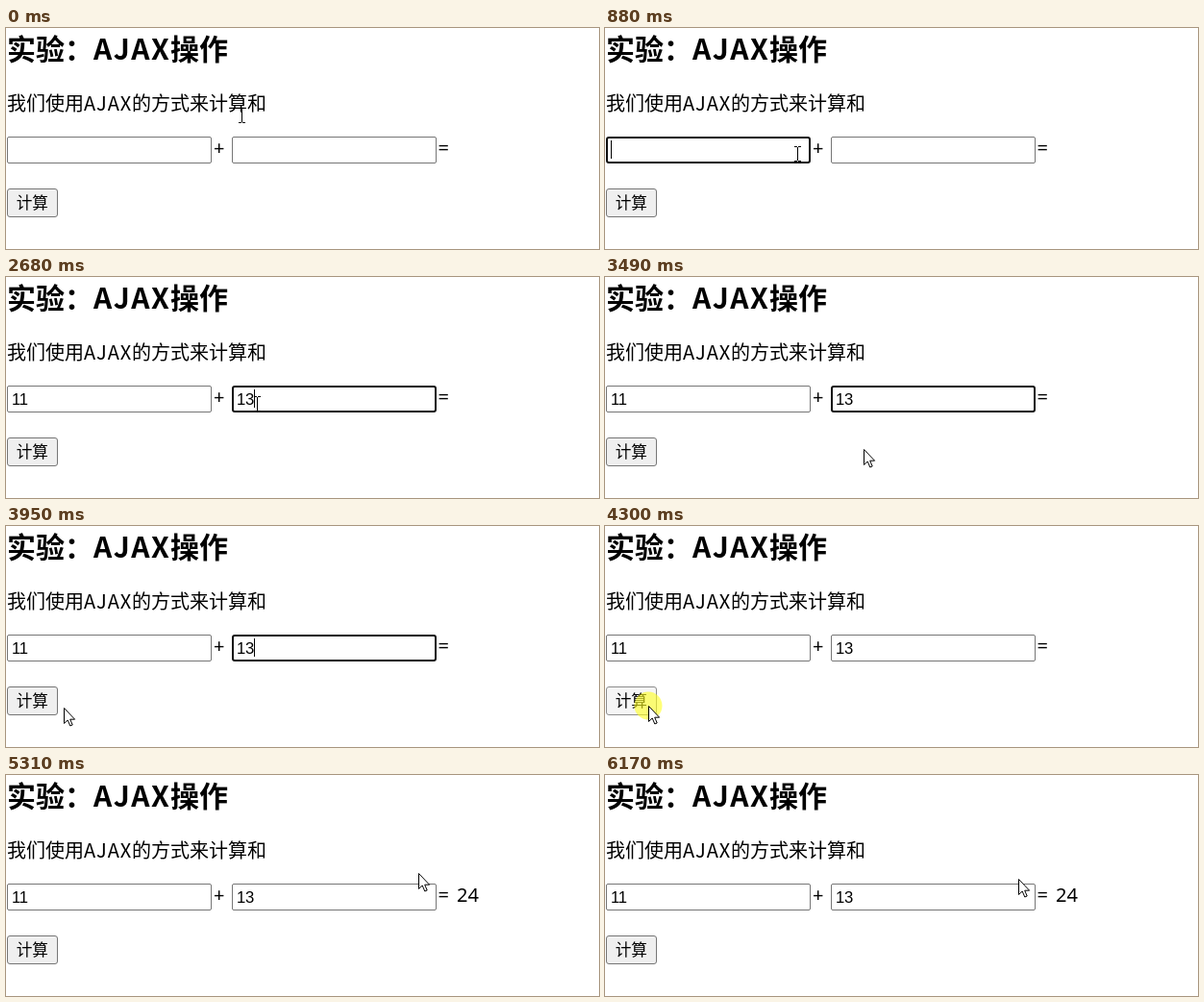
These frames come from a looping animation (617x230 px, 6240 ms). An HTML page:

```html
<!DOCTYPE html>
<html lang="zh-CN">
<head>
<meta charset="utf-8">
<title>AJAX</title>
<style>
  html, body { margin: 0; width: 100%; height: 100%; overflow: hidden; background: #fff; }
  svg { display: block; width: 617px; height: 230px; }
  text { white-space: pre; font: 20px "Noto Sans CJK SC", "Noto Sans CJK", sans-serif; }
  .title { font-size: 30px; font-weight: 700; }
  .latin { font-family: "Noto Sans", sans-serif; }
  .value { font: 16.67px "Liberation Sans", Arial, sans-serif; letter-spacing: -.27px; }
  .label { font-size: 16.67px; }
</style>
</head>
<body>
<svg viewBox="0 0 617 230">
  <text class="title" x="1" y="33">实验：</text>
  <text class="title" x="91" y="33" letter-spacing="1.5">AJAX</text>
  <text class="title" x="171" y="33">操作</text>
  <text x="1" y="86">我们使用</text>
  <text x="81" y="86" letter-spacing=".9">AJAX</text>
  <text x="131" y="86">的方式来计算和</text>
  <text class="latin" x="216" y="132">+</text>
  <text class="latin" x="449.5" y="132">=</text>
  <text class="latin" x="469" y="132" id="sum">24</text>
  <g id="fields"></g>
  <rect id="button" x="1.5" y="167.5" width="52" height="29" rx="2.5"/>
  <text class="label" x="10.7" y="188">计算</text>
  <circle id="press" r="14.5" fill="#ffff1e" fill-opacity=".6"/>
  <path id="arrow" d="M.5 .5V16.5L4.2 13L6.8 19L9.2 18L6.7 12.2H11.6Z" fill="#fff" stroke="#000"/>
  <path id="beam" d="M-3 -7.5H0M1 -7.5H4M.5 -7V7M-3 7.5H0M1 7.5H4" fill="none" stroke="#000"/>
</svg>
<script>
const LOOP = 6240, TICK = 67, BLINK = 500;
const $ = id => document.getElementById(id);

// pointer path: tick, x, y
const path = [
  [0, 245, 91], [4, 221, 110], [8, 200, 131], [22, 200, 131],
  [25, 242, 132], [27, 261, 132], [43, 261, 132], [44, 430, 176],
  [45, 567, 206], [46, 393, 208], [47, 393, 208], [48, 350, 212],
  [52, 269, 179], [57, 74, 190], [61, 45, 187], [69, 45, 187],
  [70, 68, 184], [73, 287, 125], [76, 398, 96], [79, 429, 102],
  [81, 429, 102], [82, 429, 104], [83, 430, 107], [91, 430, 107], [92, 430, 108]
];
const presses = [[750, 880], [1950, 2080], [4300, 4430]];
const inputs = [
  { x: 1, value: "11", typed: [1210, 1480], focus: 750, blur: 1950 },
  { x: 235, value: "13", typed: [2410, 2680], focus: 1950, blur: 4300 }
];

function add(parent, name, attrs) {
  const el = document.createElementNS("http://www.w3.org/2000/svg", name);
  set(el, attrs);
  return parent.appendChild(el);
}
function set(el, attrs) {
  for (const key in attrs) el.setAttribute(key, attrs[key]);
}
function show(el, on) {
  el.setAttribute("visibility", on ? "visible" : "hidden");
}
const inside = (p, x, y, w, h) => p.x >= x && p.x < x + w && p.y >= y && p.y < y + h;

for (const f of inputs) {
  f.box = add($("fields"), "rect", { fill: "#fff" });
  f.text = add($("fields"), "text", { class: "value", x: f.x + 5, y: 132.5 });
  f.caret = add($("fields"), "rect", { y: 117, width: 1, height: 19 });
}

function pointerAt(t) {
  const n = Math.floor(t / TICK + .05);
  const i = path.findIndex(k => k[0] > n);
  if (i < 0) {
    const end = path[path.length - 1];
    return { x: end[1], y: end[2] };
  }
  const a = path[i - 1], b = path[i], u = (n - a[0]) / (b[0] - a[0]);
  return { x: Math.round(a[1] + (b[1] - a[1]) * u), y: Math.round(a[2] + (b[2] - a[2]) * u) };
}

function drawInput(f, t, p) {
  const focused = t >= f.focus && t < f.blur;
  const count = f.typed.filter(k => t >= k).length;
  const last = count ? f.typed[count - 1] : f.focus;
  const hover = inside(p, f.x, 113, 213, 28);
  const w = focused ? 2 : 1;
  set(f.box, {
    x: f.x + w / 2, y: 113 + w / 2, width: 213 - w, height: 28 - w,
    rx: focused ? 2 : 1.5, "stroke-width": w,
    stroke: focused ? "#101010" : hover ? "#4f4f4f" : "#767676"
  });
  f.text.textContent = f.value.slice(0, count);
  f.caret.setAttribute("x", f.x + 5 + 9 * count);
  show(f.caret, focused && Math.floor((t - last) / BLINK) % 2 === 0);
}

function draw(t) {
  const p = pointerAt(t);
  const pressed = presses.some(([a, b]) => t >= a && t < b);
  const overField = inputs.some(f => inside(p, f.x, 113, 213, 28));
  const overText = inside(p, 1, 66, 270, 27) || inside(p, 214, 113, 21, 28);
  const overButton = inside(p, 1, 167, 53, 30);
  inputs.forEach(f => drawInput(f, t, p));

  const [fill, stroke] = !overButton ? ["#efefef", "#767676"]
    : pressed ? ["#f5f5f5", "#8d8d8d"] : ["#e5e5e5", "#4f4f4f"];
  set($("button"), { fill, stroke });
  show($("sum"), t >= 4430);

  const place = `translate(${p.x} ${p.y})`;
  for (const id of ["press", "arrow", "beam"]) set($(id), { transform: place });
  show($("press"), pressed);
  show($("beam"), overField || overText);
  show($("arrow"), !overField && !overText);
}

const start = performance.now();
function frame() {
  draw((performance.now() - start) % LOOP);
  requestAnimationFrame(frame);
}
frame();
</script>
</body>
</html>
```
